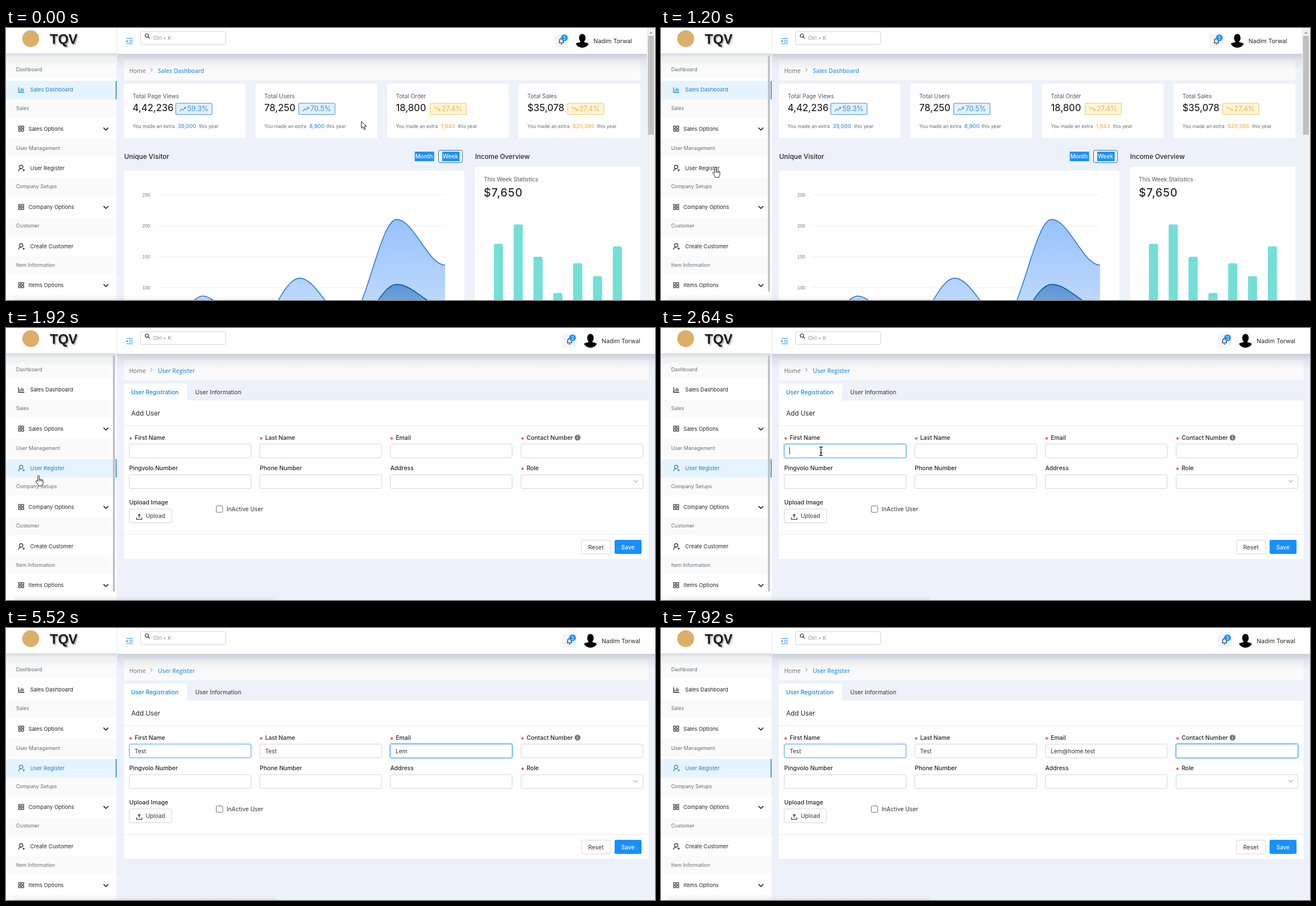
Recreate the animation shown at these times as an HTML page. Size 1156 by 484 pixels, loop 8000 ms.

```html
<!DOCTYPE html>
<html lang="en">
<head>
<meta charset="utf-8">
<title>Dashboard</title>
<style>
  html, body { margin: 0; width: 100%; height: 100%; overflow: hidden; background: #edf1f9; }
  svg { display: block; width: 1156px; height: 484px; }
  text { font-family: Inter, sans-serif; white-space: pre; }
  .crumb { font-family: "Open Sans", sans-serif; }
  .plain { font-family: "Liberation Sans", sans-serif; }
</style>
</head>
<body>
<svg id="stage" viewBox="0 0 1156 484" xmlns="http://www.w3.org/2000/svg"></svg>
<script>
const LOOP = 8000, SWITCH = 1920;
const INK = '#262626', GREY = '#666b70', BLUE = '#1890ff', DEEP = '#1d7fc9';

// ---------- drawing helpers ----------
const rect = (x, y, w, h, fill, more = '') =>
  `<rect x="${x}" y="${y}" width="${w}" height="${h}" fill="${fill}" ${more}/>`;
const path = (d, stroke, width = 1, more = 'fill="none"') =>
  `<path d="${d}" stroke="${stroke}" stroke-width="${width}" ${more}/>`;
// y is the middle of the capitals
const text = (x, y, size, str, fill = INK, weight = 400, more = '') =>
  `<text x="${x}" y="${(y + size * 0.365).toFixed(2)}" font-size="${size}" font-weight="${weight}" fill="${fill}" ${more}>${str}</text>`;
const group = (id, body, more = '') => `<g id="${id}" ${more}>${body}</g>`;
const at = (x, y, body) => `<g transform="translate(${x} ${y})">${body}</g>`;
const fade = (id, stops) => `<linearGradient id="${id}" x1="0" y1="0" x2="0" y2="1">` +
  stops.map(([o, c, a]) => `<stop offset="${o}" stop-color="${c}" stop-opacity="${a}"/>`).join('') + '</linearGradient>';

const defs = '<defs>' +
  fade('drop', [[0, '#4a5468', .22], [.35, '#4a5468', .1], [1, '#4a5468', 0]]) +
  fade('rise', [[0, '#555', 0], [1, '#555', .16]]) +
  fade('views', [[0, '#96c2fb', 1], [1, '#d4e5fe', 1]]) +
  fade('visits', [[0, '#5c94d6', 1], [1, '#a9c9ee', 1]]) +
  '<clipPath id="round"><circle r="13"/></clipPath>' +
  '<filter id="soft" x="-20%" y="-40%" width="140%" height="200%"><feDropShadow dx="1.5" dy="2" stdDeviation="1.3" flood-color="#000" flood-opacity=".4"/></filter>' +
  '</defs>';

// ---------- icons ----------
const tiles = y => [[22.5, -4.5], [28, -4.5], [22.5, 1], [28, 1]]
  .map(([x, d]) => rect(x, y + d, 3.6, 3.6, 'none', `stroke="${INK}" stroke-width="1.1"`)).join('');
const person = (y, c) => `<circle cx="27" cy="${y - 1.8}" r="3.1" fill="none" stroke="${c}" stroke-width="1.2"/>` +
  path(`M22.5 ${y + 6}q.3-4.5 4.5-4.6M29.5 ${y + 4}h4M31.5 ${y + 2}v4`, c, 1.2);
const graph = (y, c) => path(`M22.5 ${y - 4}v9h10M25.3 ${y + 3}v-3M27.9 ${y + 3}v-6M30.5 ${y + 3}v-4.5`, c, 1.3);
const chevron = (x, y, r, c, w) => path(`M${x - r} ${y - r / 2}l${r} ${r}l${r} ${-r}`, c, w);

// ---------- sidebar ----------
function sidebar() {
  let s = rect(0, 0, 197, 484, '#fff');
  const heads = [['Dashboard', 57, 74], ['Sales', 127, 143], ['User Management', 197, 213.5],
    ['Company Setups', 266, 282], ['Customer', 337, 352], ['Item Information', 406, 421.5]];
  for (const [label, top, mid] of heads)
    s += rect(0, top, 197, 32, '#fafafa') + text(18, mid, 9, label, GREY);
  s += rect(0, 475, 197, 9, '#fafafa');
  for (const [label, y] of [['Sales Options', 179], ['Company Options', 318.5], ['Items Options', 457.5]])
    s += tiles(y) + text(40, y, 9.6, label) + chevron(178, y + .5, 4.3, INK, 1.6);
  s += group('hover', rect(0, 233, 197, 33, '#e6f4ff'));
  const row = (y, mid, on, icon, label, id) => group(id,
    (on ? rect(0, y, 197, 33, '#e6f4ff') + rect(195.5, y, 1.5, 33, DEEP) : '') +
    icon(mid, on ? DEEP : INK) + text(43, mid, 9.6, label, on ? DEEP : INK));
  s += row(94, 109.5, true, graph, 'Sales Dashboard', 'dashOn') + row(94, 109.5, false, graph, 'Sales Dashboard', 'dashOff');
  s += row(233, 249, true, person, 'User Register', 'userOn') + row(233, 249, false, person, 'User Register', 'userOff');
  s += person(388.5, INK) + text(43, 388.5, 9.6, 'Create Customer');
  s += rect(0, 45, 197, 22, 'url(#drop)') + rect(0, 0, 197, 45, '#fff');
  s += '<circle cx="44" cy="19" r="15" fill="#dcae68"/>';
  s += text(78, 19.5, 24, 'TQV', '#1c1c1c', 700, 'class="plain" filter="url(#soft)"');
  return s + group('bar', rect(190.5, 49, 3.5, 420, '#bdbfc1', 'rx="1.7"'));
}

// ---------- top bar ----------
function topBar() {
  let s = rect(197, 0, 959, 46, '#fff') + rect(197, 0, 1, 46, '#e8e8e8');
  s += path('M214.5 18.5h11.5M219 22h7M219 25h7M214.5 28h11.5', BLUE, 1.2) + '<path d="M214.5 21v5l3-2.5z" fill="#1890ff"/>';
  s += rect(239.5, 6.5, 152, 23, '#fff', 'rx="3" stroke="#d3d3d3"');
  s += '<circle cx="251" cy="13.5" r="3" fill="none" stroke="#262626" stroke-width="1.1"/>' + path('M253.3 15.8l3 3', INK, 1.2);
  s += text(262, 18, 9, 'Ctrl + K', '#8a8a8a');
  s += group('account',
    rect(977, 10.5, 25, 24.5, '#f3f5f8', 'rx="2"') +
    path('M984.5 26.5h9.5M986 26.5v-4a3.3 3.6 0 0 1 6.6 0v4M988 28.6h2.6', INK, 1.2) +
    '<circle cx="994.5" cy="17.5" r="6" fill="#1890ff"/>' + text(994.5, 17.5, 8.5, '3', '#fff', 400, 'text-anchor="middle"') +
    at(1026.5, 22, '<g clip-path="url(#round)"><circle r="13" fill="#fdfdfd"/><ellipse cy="-4.2" rx="5.8" ry="7.4"/>' +
      '<path d="M-3.5 0h7v3.2q9.5 1.4 10 6v5h-27v-5q.5-4.6 10-6z"/></g>') +
    text(1046.5, 23, 10.6, 'Nadim Torwal'));
  return s;
}

const crumbs = (w, label) => rect(210, 57, w, 36, '#fafafa', 'rx="2"') +
  text(219.5, 76, 10.3, 'Home', '#666', 400, 'class="crumb"') +
  path('M257.5 71.5l3 3l-3 3', '#777', 1) +
  text(270.5, 76, 10.3, label, '#3a97e6', 600, 'class="crumb"') +
  rect(198, 46, 958, 28, 'url(#drop)');

// ---------- sales page ----------
function curve(vals) {
  const pts = vals.map((v, i) => [264 + i * 86.35, 571.6 - 1.1 * v]);
  return pts.map(([x, y], i) => {
    if (!i) return `M${x} ${y}`;
    const [px, py] = pts[i - 1], k = (x - px) * .35;
    return `C${px + k} ${py} ${x - k} ${y} ${x} ${y}`;
  }).join('');
}

function salesPage() {
  let s = crumbs(920, 'Sales Dashboard');
  const cards = [['Total Page Views', '4,42,236', '59.3%', '35,000', 302.5, 344, 1], ['Total Users', '78,250', '70.5%', '8,900', 521.5, 571, 1],
    ['Total Order', '18,800', '27.4%', '1,943', 755.5, 805, 0], ['Total Sales', '$35,078', '27.4%', '$20,395', 1000.5, 1053, 0]];
  cards.forEach(([name, value, rate, extra, bx, tail, up], i) => {
    const x = 210 + i * 234.4, tx = x + 15.6, c = up ? '#428fdc' : '#e8b84e';
    s += rect(x, 99, 216.6, 97, '#fff', 'rx="2"') + text(tx, 121, 10.2, name, '#555');
    s += text(tx, 142, 16.7, value, INK, 500);
    s += rect(bx, 134, 64.5, 20, up ? '#e1f1ff' : '#fff5d8', `stroke="${up ? '#3a8bd6' : '#edc95f'}" rx="1"`);
    s += at(bx + 7, 144, up ? path('M0 4l3.5-4l2.5 2l4.5-5M7.5-3h3v3', c, 1.2) : path('M0-4l3.5 4l2.5-2l4.5 5M7.5 3h3v-3', c, 1.2));
    s += text(bx + 20.5, 143.5, 12.4, rate, c);
    s += text(tx, 174.5, 8.5, 'You made an extra', GREY) + text(tx + 80.3, 174.5, 9.6, extra, c, 500) + text(tail, 174.5, 8.5, 'this year', GREY);
  });
  s += text(210.5, 229, 11.9, 'Unique Visitor', INK, 500) + text(835.5, 229, 11.7, 'Income Overview', INK, 500);
  s += rect(728, 220, 34.5, 17, '#1e90ff') + text(729, 228.5, 10.2, 'Month', '#fff', 500);
  s += rect(770.5, 217.5, 42.5, 22, '#f4f8ff', 'rx="2.5" stroke="#2d6da8"') + rect(777, 220, 31, 17, '#1e90ff') + text(778, 228.5, 10.2, 'Week', '#fff', 500);

  s += rect(210, 254, 606.5, 230, '#fff', 'rx="2"');
  for (const v of [250, 200, 150, 100]) {
    const y = 571.5 - 1.1 * v;
    s += rect(268, y, 514, 1, '#f0f0f0') + text(257, y, 8.4, v, '#777', 400, 'class="plain" text-anchor="end"');
  }
  const area = (vals, fill, stroke) => {
    const d = curve(vals);
    return `<path d="${d}V571H264z" fill="url(#${fill})"/>` + path(d, stroke, 1.6);
  };
  s += area([0, 86, 28, 115, 48, 210, 136], 'views', '#2a7bd2') + area([0, 43, 14, 56, 24, 105, 68], 'visits', '#0f56a3');

  s += rect(835, 247, 295, 237, '#fff', 'rx="2"') + text(851, 269, 10.2, 'This Week Statistics', '#555') +
    text(851, 292.5, 19.6, '$7,650', INK, 500, 'letter-spacing="1"');
  [80, 95, 70, 42, 65, 55, 78].forEach((v, i) => s += rect(869 + i * 35.3, 568 - 2.3 * v, 16.3, 2.3 * v, '#74dfd6', 'rx="3"'));
  return s;
}

const scroller = () => rect(1141.5, 0, 14.5, 484, '#f1f1f1') + rect(1143.5, 14, 10.5, 176, '#c1c1c1') +
  '<path d="M1145.5 10h6.5l-3.25-3.6z" fill="#a3a3a3"/>';

// ---------- form page ----------
const COLS = [219.5, 452, 684.5, 917.5];
const FIELDS = [
  { str: 'Test', keys: [2800, 2960, 3120, 3280], from: 2560, to: 3520 },
  { str: 'Test', keys: [3900, 4080, 4200, 4320], from: 3520, to: 4480 },
  { str: 'Lem@home.test', keys: [4860, 4930, 5000, 6320, 6370, 6420, 6470, 6520, 6570, 6620, 6670, 6720, 6880], from: 4480, to: 6960 },
  { str: '', keys: [], from: 6960, to: LOOP }
];

function formPage() {
  let s = crumbs(934.5, 'User Register');
  s += rect(210, 99, 112.5, 32, '#fff', 'rx="2"') + rect(210, 129, 934.5, 282, '#fff');
  s += text(223, 114.5, 10.25, 'User Registration', '#1684e0', 500) + text(337, 114.5, 10.4, 'User Information', '#333');
  s += text(223, 152, 11.7, 'Add User') + rect(210, 173.5, 934.5, 1, '#ececec') + rect(210, 367, 934.5, 1, '#ececec');
  const label = (x, y, str, must) => (must ? text(x, y + 2.8, 13, '*', '#e0403c', 700, 'class="plain"') : '') +
    text(x + (must ? 9.7 : 0), y, 10.5, str, INK, 500);
  ['First Name', 'Last Name', 'Email', 'Contact Number'].forEach((n, i) => {
    s += label(COLS[i], 195, n, true);
    s += rect(COLS[i] - 1.5, 205, 220, 27.5, 'none', `id="glow${i}" rx="4" stroke="#1890ff" stroke-opacity=".25" stroke-width="2"`);
    s += rect(COLS[i], 206.5, 217, 24.5, '#fff', `id="box${i}" rx="2.5"`);
    s += text(COLS[i] + 9.5, 219, 10.3, '', '#333', 400, `id="val${i}"`);
  });
  ['Pingvolo Number', 'Phone Number', 'Address', 'Role'].forEach((n, i) => {
    s += label(COLS[i], 249, n, i === 3) + rect(COLS[i], 261, 217, 24.5, '#fff', 'rx="2.5" stroke="#d4d4d4"');
  });
  s += chevron(1121.5, 272.5, 3.8, '#a8a8a8', 1.1);
  s += '<circle cx="1018" cy="195" r="5.2" fill="#757575"/>' + path('M1018 194v4M1018 191.6v1.3', '#fff', 1.1);
  s += rect(227.8, 212, 1, 13, INK, 'id="caret"');
  s += text(219.5, 310, 10.5, 'Upload Image', INK, 500);
  s += rect(219.5, 322, 75.5, 24.5, '#fff', 'rx="2.5" stroke="#d4d4d4"') + path('M232.5 337v3.5h9.5v-3.5M237.2 338v-6.5M234.8 334l2.4-2.6l2.4 2.6', INK, 1.1) + text(249, 334.5, 10.2, 'Upload', '#333');
  s += rect(374.5, 316.5, 11.5, 11.5, '#fff', 'rx="2" stroke="#707070"') + text(393, 322.5, 10.3, 'InActive User', '#333');
  s += rect(1025, 377.5, 52, 24.5, '#fff', 'rx="2.5" stroke="#d4d4d4"') + text(1037, 390, 10.4, 'Reset', '#333');
  s += rect(1084, 377, 48, 25, BLUE, 'rx="2.5"') + text(1096, 390, 10.1, 'Save', '#fff', 500);
  return s;
}

// ---------- pointers ----------
const pointers = group('pointer',
  group('arrow', path('M0 0v12.5l2.9-2.6l2.2 5l2.1-.9l-2.2-4.9h4z', '#111', 1, 'fill="#fff"')) +
  group('hand', path('M-1.4 1.2q0-1.5 1.4-1.5t1.4 1.5v5q1.3-.8 2.3.3q1.3-.5 2.2.6q2.1-.3 2.1 1.8v3.2q0 2.6-1.7 4.2v1.7h-6.8v-1.6l-4-5.5q-1-1.8.5-2.3q1-.2 2.6 1.7zM1.4 6v3.5M3.7 6.8v3M5.9 7.5v2.6', '#222', 1, 'fill="#fff" stroke-linejoin="round"')) +
  group('beam', path('M-3-7.5q2.6 0 3 1.2q.4-1.2 3-1.2M-3 8q2.6 0 3-1.2q.4 1.2 3 1.2M0-6.5v13.5M-1.6 3h3.2', '#111', 1.3)));

document.getElementById('stage').innerHTML = defs + rect(0, 0, 1156, 484, '#edf1f9') +
  group('sales', salesPage()) + group('form', formPage()) + group('top', topBar()) +
  group('scroll', scroller()) + sidebar() +
  rect(14, 476, 466, 8, 'url(#rise)', 'opacity=".5"') + pointers;

// ---------- motion ----------
const el = {};
document.querySelectorAll('[id]').forEach(n => el[n.id] = n);
const show = (id, on) => el[id].setAttribute('visibility', on ? 'visible' : 'hidden');
const clamp = v => Math.max(0, Math.min(1, v));
const ramp = (t, a, b) => clamp((t - a) / (b - a));
const ease = k => k * k * (3 - 2 * k);

const PATH = [[120, 633, 166], [1180, 97, 248], [1240, 97, 248], [1760, 58, 263], [1920, 58, 263], [2500, 285, 219]];
function place(t) {
  let [, x, y] = PATH[0];
  for (let i = 1; i < PATH.length; i++) {
    const [a, ax, ay] = PATH[i - 1], [b, bx, by] = PATH[i];
    if (t < a) break;
    const k = ease(ramp(t, a, b));
    x = ax + (bx - ax) * k;
    y = ay + (by - ay) * k;
  }
  return [x, y];
}

function draw(t) {
  const form = t >= SWITCH, [x, y] = place(t);
  for (const id of ['sales', 'scroll', 'dashOn', 'userOff']) show(id, !form);
  for (const id of ['form', 'dashOff', 'userOn']) show(id, form);
  el.account.setAttribute('transform', `translate(${form ? 14.5 : 0} 0)`);
  el.hover.setAttribute('opacity', form ? 0 : ramp(t, 1220, 1500));
  el.bar.setAttribute('opacity', ramp(t, 880, 1000) * (1 - ramp(t, 2900, 3200)));

  const over = form && x > 219 && y < 232;
  let caret = false;
  FIELDS.forEach((f, i) => {
    const on = form && t >= f.from && t < f.to;
    const n = f.keys.filter(k => k <= t).length;
    el['val' + i].textContent = f.str.slice(0, n);
    el['box' + i].setAttribute('stroke', on || (!i && over) ? '#3f9ce8' : '#d4d4d4');
    el['glow' + i].setAttribute('opacity', ramp(t, f.from - 60, f.from + 240) * (1 - ramp(t, f.to, f.to + 300)));
    if (!on) return;
    const last = Math.max(f.from, n ? f.keys[n - 1] : 0);
    caret = (t - last) % 1000 < 500;
    el.caret.setAttribute('x', COLS[i] + 9 + (n ? el['val' + i].getComputedTextLength() + .5 : 0));
  });
  show('caret', caret);

  const seen = t < 4720, kind = x < 190 ? 'hand' : over ? 'beam' : 'arrow';
  for (const k of ['arrow', 'hand', 'beam']) show(k, seen && k === kind);
  el.pointer.setAttribute('transform', `translate(${x.toFixed(1)} ${y.toFixed(1)})`);
}

const start = performance.now();
function tick() {
  draw((performance.now() - start) % LOOP);
  requestAnimationFrame(tick);
}
tick();
</script>
</body>
</html>
```
